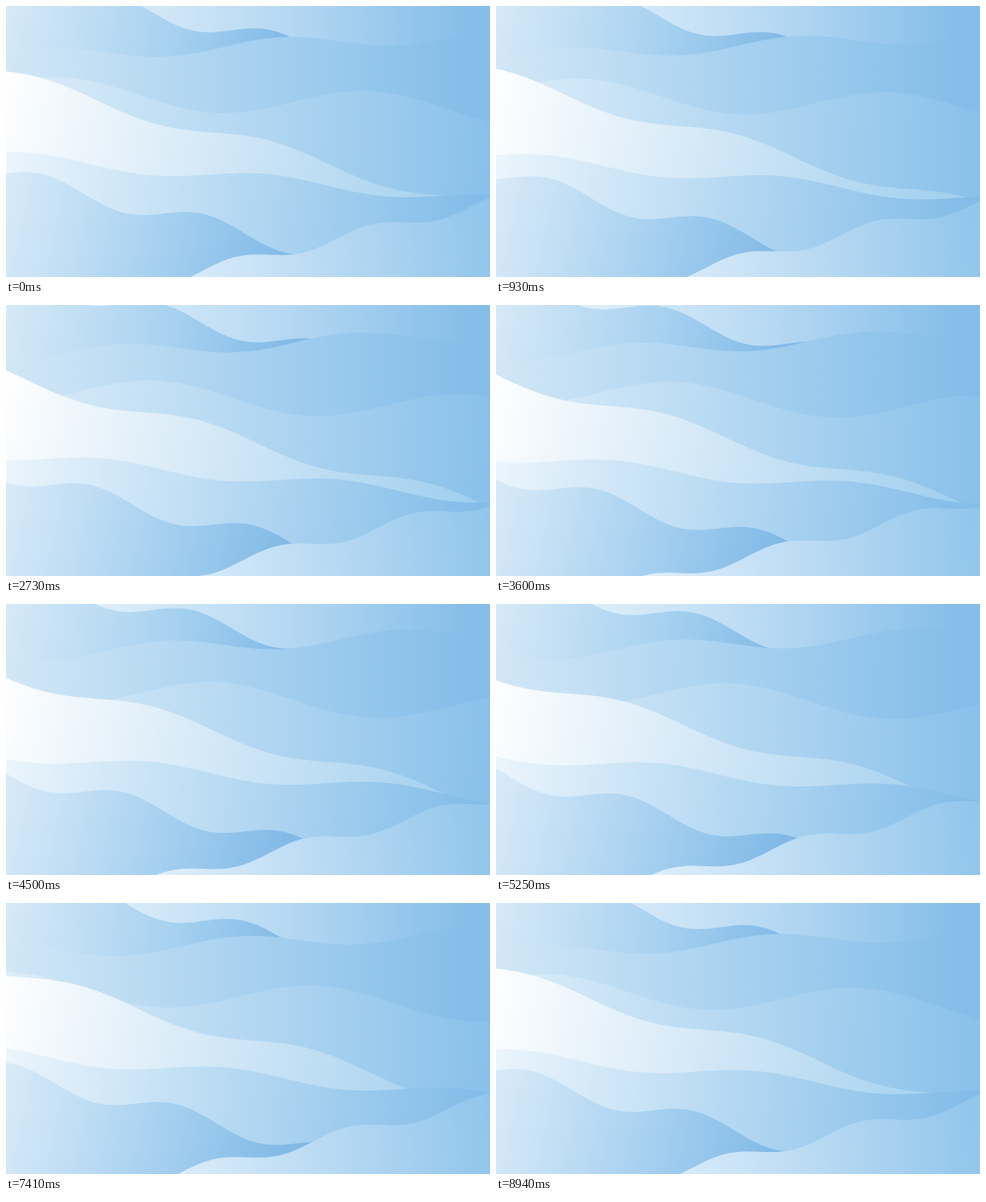
Animation of 550 by 309 pixels, one loop 8.97 s. Source, as an HTML page with a canvas:

```html
<!DOCTYPE html>
<html lang="en">
<head>
<meta charset="utf-8">
<title>Drifting waves</title>
<style>
  html, body { margin: 0; width: 100%; height: 100%; overflow: hidden; }
  canvas { display: block; }
</style>
</head>
<body>
<canvas width="550" height="309"></canvas>
<script>
const W = 550, H = 309, LOOP = 8970;
const ctx = document.querySelector('canvas').getContext('2d');

// line: gradient axis [x0, y0, x1, y1]; colours are spread along it
function gradient(line, ...stops) {
  const g = ctx.createLinearGradient(...line);
  for (const [at, colour] of stops) g.addColorStop(at, colour);
  return g;
}

const backdrop = gradient([0, 0, 320, 50],
  [0, '#d6e9f7'], [0.6, '#a6d1f0'], [1, '#82bae7']);

// Each edge is a sloping sine that drifts by one wavelength per loop.
// base + slope * x is its middle line, crest the phase offset in x.
const layers = [
  { base: -31.3, slope: 0.23, amp: 10.5, length: 181, crest: 211, dir: 1, to: 0,
    fill: gradient([90, 0, 530, 0], [0, '#e2f0fa'], [0.5, '#b7d9f3'], [1, '#84bde8']) },
  { base: 58.5, slope: -0.048, amp: -7.9, length: 265, crest: 314, dir: 1, to: H,
    fill: gradient([0, 0, 530, 0], [0, '#d2e7f6'], [0.5, '#a9d2f0'], [1, '#84bde8']) },
  { base: 94.8, slope: 0.0447, amp: -16.3, length: 350, crest: 64, dir: 1, to: H,
    fill: gradient([0, 0, 550, 20], [0, '#deeef9'], [0.5, '#b4d8f2'], [1, '#8ac1ea']) },
  { base: 79.4, slope: 0.275, amp: 8.3, length: 262, crest: 170.5, dir: -1, to: H,
    fill: gradient([0, 90, 530, 200], [0, '#fdfeff'], [0.5, '#cfe6f6'], [1, '#a0cfef']) },
  { base: 171.6, slope: 0.09, amp: 6.6, length: 267, crest: 163, dir: 1, to: H,
    fill: gradient([0, 170, 540, 225], [0, '#ebf5fc'], [0.5, '#b4d8f2'], [1, '#82bce8']) },
  { base: 192, slope: 0.248, amp: 10.5, length: 183, crest: 134, dir: 1, to: H,
    fill: gradient([0, 205, 325, 275], [0, '#d8eaf8'], [0.5, '#abd3f1'], [1, '#80b9e6']) },
  { base: 355.8, slope: -0.241, amp: 6.8, length: 153, crest: 338, dir: 1, to: H,
    fill: gradient([170, 300, 555, 265], [0, '#e0effa'], [0.5, '#b9daf3'], [1, '#90c5eb']) }
];

function drawLayer({ base, slope, amp, length, crest, dir, to, fill }, phase) {
  const start = crest + dir * length * phase;
  ctx.beginPath();
  ctx.moveTo(-2, to);
  for (let x = -2; x <= W + 2; x += 2) {
    ctx.lineTo(x, base + slope * x + amp * Math.cos(2 * Math.PI * (x - start) / length));
  }
  ctx.lineTo(W + 2, to);
  ctx.fillStyle = fill;
  ctx.fill();
}

function draw() {
  const phase = performance.now() % LOOP / LOOP;
  ctx.fillStyle = backdrop;
  ctx.fillRect(0, 0, W, H);
  for (const layer of layers) drawLayer(layer, phase);
  requestAnimationFrame(draw);
}
draw();
</script>
</body>
</html>
```
